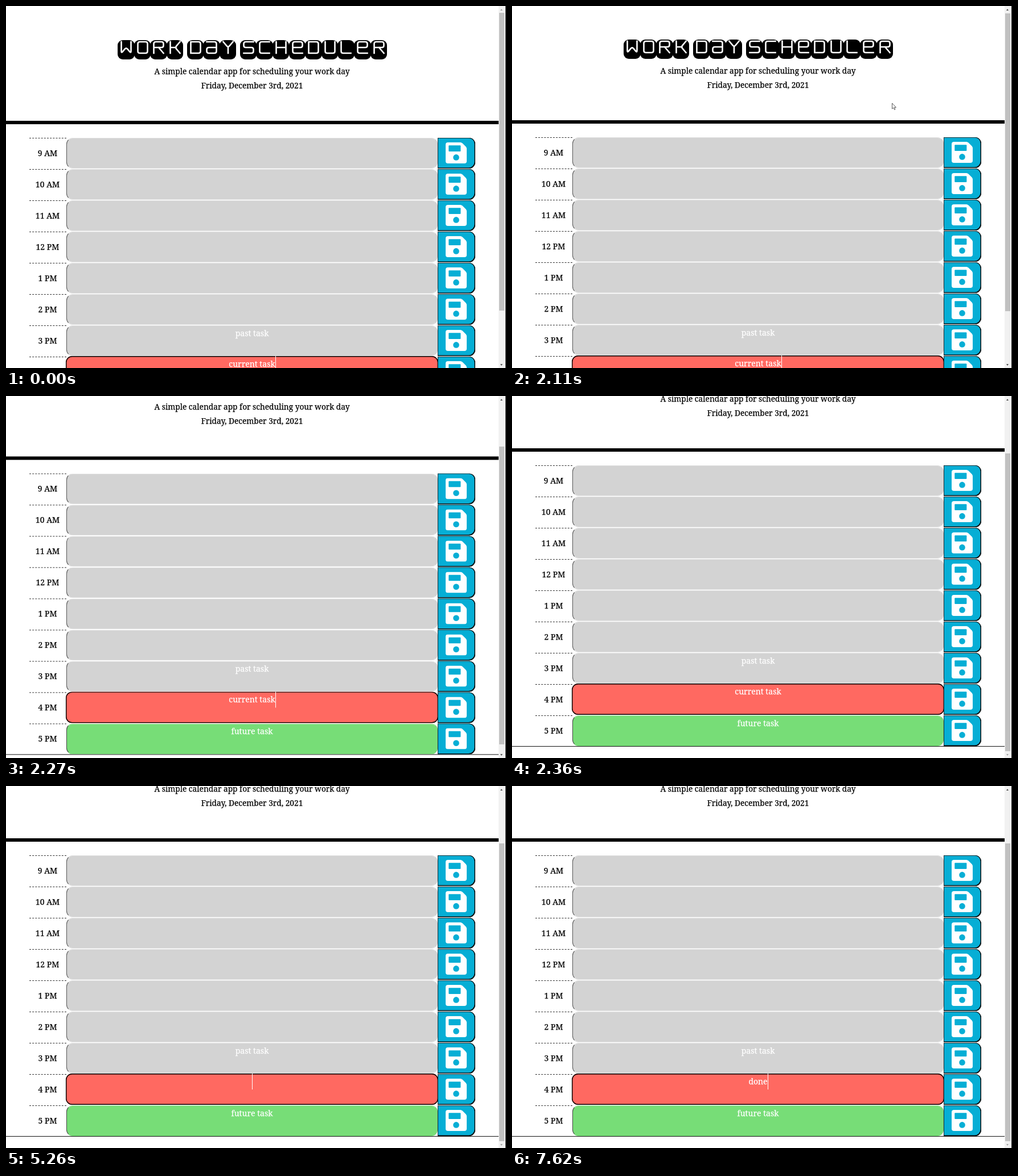
Animation, 878 px wide and 637 px high, one loop 8 s. Source, as an HTML page:

```html
<!DOCTYPE html>
<html lang="en">
<head>
<meta charset="utf-8">
<title>Work Day Scheduler</title>
<style>
html, body { margin: 0; width: 100%; height: 100%; overflow: hidden; background: #fff; }
body { position: relative; font: 14px/27px "Noto Serif", serif; color: #000; -webkit-text-stroke: .25px; }
#page { position: absolute; left: 0; top: 0; width: 865px; height: 726px; border-bottom: 1px solid #111; }
#page div, #page p, h1, #pointer, #bar, #bar * { position: absolute; box-sizing: border-box; margin: 0; }
p { left: 0; width: 864px; text-align: center; font-size: 13.72px; }
h1 { left: 0; top: 60px; font: 22px/26px Inter, sans-serif; -webkit-text-stroke: 0; }
h1 span { position: absolute; width: 29.5px; height: 34px; border-radius: 9px; background: #000; color: transparent; text-align: center; }
h1 svg { position: absolute; left: 0; top: 0; fill: none; stroke: #fff; stroke-width: 2.6; stroke-linecap: square; }
#rule { top: 201.5px; width: 865px; height: 6.8px; background: #000; }
.hour { left: 41px; width: 65px; height: 55px; border-top: 1px dashed #333; line-height: 51px; text-align: center; padding-right: 1px; }
.task { left: 106px; width: 652px; height: 54px; border-radius: 11px; border: 1px solid; border-color: #e2e2e2 #ccc #e2e2e2 #555; background: #d3d3d3; color: #fff; text-align: center; line-height: 25px; }
.now { left: 105px; width: 654px; height: 55px; margin-top: -1px !important; border: 0; box-shadow: inset 0 0 0 1.4px #000; background: #ff6961; line-height: 27px; }
.later { background: #77dd77; border-color: #a9e8a9 #77c777 #77dd77 #444; }
.save { left: 758px; width: 66px; height: 54px; border-radius: 0 11px 11px 0; background: #06aed5; box-shadow: inset 0 0 0 .8px #111, inset -.7px -.7px 0 .8px #111; }
.save svg { position: absolute; left: 14px; top: 8.2px; width: 37px; height: 37px; fill: #fff; }
mark { display: inline-block; height: 27px; background: #2f71d9; color: #fff; vertical-align: top; }
.task i { display: inline-block; width: 1px; height: 28px; margin-right: -1px; background: #fff; vertical-align: top; }
#pointer { left: 0; top: 0; }
#bar { left: 865px; top: 0; width: 13px; height: 637px; background: #f1f1f1; border-right: 1px solid #111; }
#thumb { left: 1px; top: 12px; width: 9px; height: 524px; background: #c1c1c1; }
#bar i { left: 3px; border: 0 solid transparent; border-width: 0 2.5px; }
#bar #up { top: 5px; border-bottom-width: 3px; }
#bar #down { top: 630px; border-top-width: 3px; }
</style>
</head>
<body>
<div id="page">
  <h1 aria-label="Work Day Scheduler"></h1>
  <p style="top:100.5px">A simple calendar app for scheduling your work day</p>
  <p style="top:125.5px">Friday, December 3rd, 2021</p>
  <div id="rule"></div>
</div>
<svg id="pointer" width="9" height="14"><path d="M.5.5V10.500L2.800 8.400 4.500 12 6 11.300 4.400 7.900H7.400Z" fill="#fff" stroke="#333" stroke-width=".8"/></svg>
<div id="bar"><i id="up"></i><div id="thumb"></div><i id="down"></i></div>
<script>
const $ = id => document.getElementById(id);
const page = $('page'), title = document.querySelector('h1');
const clamp = v => Math.max(0, Math.min(1, v));
const mix = (a, b, u) => a + (b - a) * u;

// Title strokes run between the keys of a 3 by 3 keypad, 1 top left to 9 bottom right
const glyphs = {
  W: '17593', O: '239712', R: '71364 59', K: '17 359 45', D: '1397 71', a: '139746', Y: '153 58',
  S: '314697', C: '3179', H: '17 39 46', e: '971364', U: '1793', L: '179'
};
const key = k => [(k - 1) % 3 * 8.5, Math.floor((k - 1) / 3) * 10];

// A line through the keys, each corner rounded by r
function stroke(keys, r = 3.5) {
  const pts = [...keys].map(key);
  const toward = ([x, y], [a, b]) => {
    const u = r / Math.hypot(a - x, b - y);
    return [mix(x, a, u), mix(y, b, u)];
  };
  return 'M' + pts.map((p, i) => {
    if (!i) return p;
    if (i === pts.length - 1) return 'L' + p;
    return `L${toward(p, pts[i - 1])}Q${p} ${toward(p, pts[i + 1])}`;
  }).join('');
}

let left = 196;
for (const c of 'WORK DaY SCHeDULeR') {
  if (c === ' ') { left += 7; continue; }
  const d = glyphs[c].split(' ').map(s => stroke(s)).join('');
  title.insertAdjacentHTML('beforeend',
    `<span style="left:${left}px">${c}<svg width="30" height="34"><path transform="translate(6.5 3)" d="${d}"/></svg></span>`);
  left += 28.65;
}

const disk = `<svg viewBox="0 0 37 37"><path d="M4 0H26Q28 0 29.500 1.500L35.500 7.500Q37 9 37 11V33Q37 37 33 37H4Q0 37 0 33V4Q0 0 4 0Z"/>
  <g fill="#06aed5"><rect x="5.300" y="5.300" width="21.100" height="10.600" rx="1"/><circle cx="18.500" cy="26.400" r="5.300"/></g></svg>`;
const tasks = { 15: 'past task', 16: '', 17: 'future task' };
for (let h = 9; h < 18; h++) {
  const kind = h === 16 ? ' now' : h > 16 ? ' later' : '';
  const top = `style="top:${232 + 55 * (h - 9)}px"`;
  page.insertAdjacentHTML('beforeend',
    `<div class="hour" ${top}>${(h - 1) % 12 + 1} ${h < 12 ? 'AM' : 'PM'}</div>` +
    `<div class="task${kind}" ${top}>${tasks[h] || ''}</div>` +
    `<div class="save" ${top}>${disk}</div>`);
}
const now = document.querySelector('.now');

// Edits of the current task: | is the caret, [ ] the selection
const edits = [
  [-290, 'current task|'], [3560, 'current t|ask'], [3750, 'current [task]'], [3870, '[current task]'], [5260, '|'],
  ...[...'done'].map((c, i) => [6260 + 86 * i, 'done'.slice(0, i + 1) + '|'])
];
const blink = 520;
function taskHtml(t) {
  const [since, text] = edits.findLast(e => e[0] <= t);
  const lit = Math.floor((t - since) / blink) % 2 === 0;
  return text.replace('|', lit ? '<i></i>' : '').replace('[', '<mark>').replace(']', '</mark>');
}

// The wheel speeds up in ticks of 80 ms until the page end
const scrollEnd = 110;
const wheelTick = t => Math.floor((t - 2110) / 80);
const scrollAt = n => n < 0 ? 0 : Math.min(scrollEnd, 1 + 37.7 * n + 4.8 * n * n);

// An arc out of the page and back, a short drift, then a nudge by the wheel
function pointerAt(t) {
  const u = clamp((t - 780) / 700), drift = clamp((t - 1700) / 270), nudge = wheelTick(t) > 0 ? 1 : 0;
  const arc = (a, b, c) => mix(mix(a, b, u), mix(b, c, u), u);
  return [arc(800, 905, 680) - 13 * drift - 2 * nudge, arc(480, 38, 156) + 14.5 * drift + 3 * nudge];
}

let shown;
function draw(t) {
  const n = wheelTick(t), y = scrollAt(n), html = taskHtml(t), [px, py] = pointerAt(t);
  page.style.transform = `translateY(${-y}px)`;
  $('thumb').style.top = 12 + y * .81 + 'px';
  $('up').style.borderBottomColor = y > 0 ? '#505050' : '#a3a3a3';
  $('down').style.borderTopColor = y < scrollEnd ? '#505050' : '#a3a3a3';
  if (html !== shown) now.innerHTML = shown = html;
  $('pointer').style.visibility = t >= 780 && n < 2 ? 'visible' : 'hidden';
  $('pointer').style.transform = `translate(${px}px, ${py}px)`;
}
const start = performance.now();
function tick() {
  draw((performance.now() - start) % 8000);
  requestAnimationFrame(tick);
}
draw(0);
requestAnimationFrame(tick);
</script>
</body>
</html>
```
